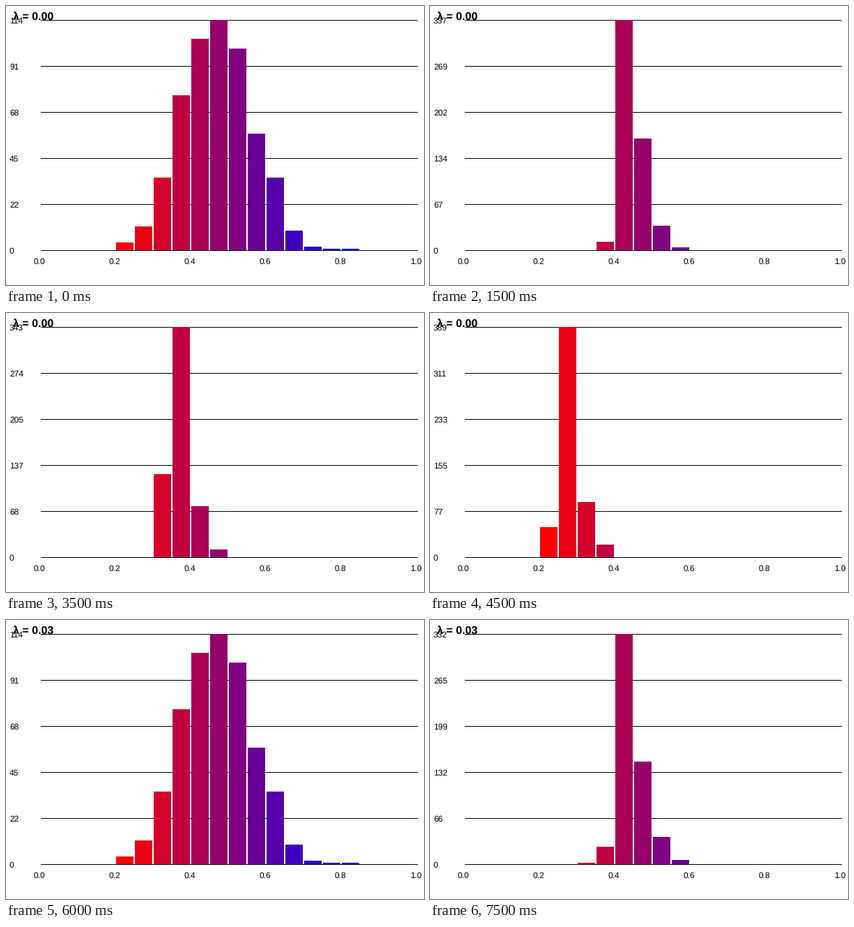
A matplotlib script that plays this animation: 600x400 px, repeating every 8000 ms.

```python
import numpy as np
import matplotlib.pyplot as plt
from matplotlib.animation import FuncAnimation
from matplotlib.patches import Rectangle

W, H, DPI = 600, 400, 100
LEFT, TOP, BASE = 50, 20, 350
BINS, STEP, BAR = 20, 27, 25
FRAMES, INTERVAL = 16, 500
RESTART = 12  # second run begins here

plt.rcParams["font.family"] = ["Liberation Sans", "DejaVu Sans"]
plt.rcParams["text.hinting"] = "none"


def hist(first, *counts):
    out = np.zeros(BINS, int)
    out[first:first + len(counts)] = counts
    return out


START = hist(4, 4, 12, 36, 77, 105, 114, 100, 58, 36, 10, 2, 1, 1)
SPREAD = hist(5, 1, 8, 32, 187, 231, 73, 20, 2, 2)
FIRST_RUN = {
    0: START,
    1: SPREAD,
    3: hist(7, 13, 337, 164, 36, 5, 1),
    7: hist(6, 124, 343, 76, 12, 1),
    9: hist(4, 51, 389, 94, 22),
    11: hist(1, 213, 229, 88, 23, 3),
}
SECOND_RUN = {0: START, 1: SPREAD, 3: hist(6, 3, 26, 332, 148, 40, 7)}


def quantiles(counts):
    total = counts.sum()
    cdf = np.concatenate([[0], np.cumsum(counts)])
    return np.interp(np.arange(total) + 0.5, cdf, np.arange(BINS + 1))


def blend(a, b, w):
    """Slide every sample of histogram a towards its rank in b."""
    values = (1 - w) * quantiles(a) + w * quantiles(b)
    return np.histogram(values, BINS, (0, BINS))[0]


def counts_at(step):
    run = FIRST_RUN
    if step >= RESTART:
        run, step = SECOND_RUN, step - RESTART
    if step in run:
        return run[step]
    lo = max(k for k in run if k < step)
    hi = min(k for k in run if k > step)
    return blend(run[lo], run[hi], ((step - lo) / (hi - lo)) ** 1.3)


def bar_color(i):
    t = np.clip((i - 4) / 12, 0, 1)
    return (1 - t, 0, t)


fig = plt.figure(figsize=(W / DPI, H / DPI), dpi=DPI, facecolor="white")
ax = fig.add_axes([0, 0, 1, 1])
ax.set_xlim(0, W)
ax.set_ylim(H, 0)
ax.axis("off")


def rect(x, y, w, h, color, z):
    return ax.add_patch(Rectangle((x, y), w, h, facecolor=color, linewidth=0,
                                  antialiased=False, zorder=z))


def label(x, y, text="", px=12, weight="normal"):
    return ax.text(x, y, text, fontsize=px * 72 / DPI, weight=weight,
                   color="black", va="baseline", zorder=3)


rows = [BASE - 66 * k for k in range(6)]
for k, y in enumerate(rows):
    rect(LEFT, y, 541, 1, "black", 1)
    label(40 + 108 * k, 370, f"{k / 5:.1f}")

bars = [rect(LEFT + STEP * i, BASE, BAR, 0, bar_color(i), 2)
        for i in range(BINS)]
ticks = [label(5, y + 5) for y in rows]
title = label(10, 20, px=16, weight="bold")


def update(step):
    counts = counts_at(step)
    peak = int(counts.max())
    for bar, n in zip(bars, counts):
        h = (BASE - TOP) * int(n) // peak
        bar.set_y(BASE - h)
        bar.set_height(h)
        bar.set_visible(h > 0)
    for k, tick in enumerate(ticks):
        tick.set_text(str(peak * k // 5))
    lam = 0.03 if step >= RESTART else 0
    title.set_text(f"λ = {lam:.2f}")
    return [*bars, *ticks, title]


anim = FuncAnimation(fig, update, frames=FRAMES, interval=INTERVAL,
                     repeat=True, repeat_delay=0)
plt.show()
```
